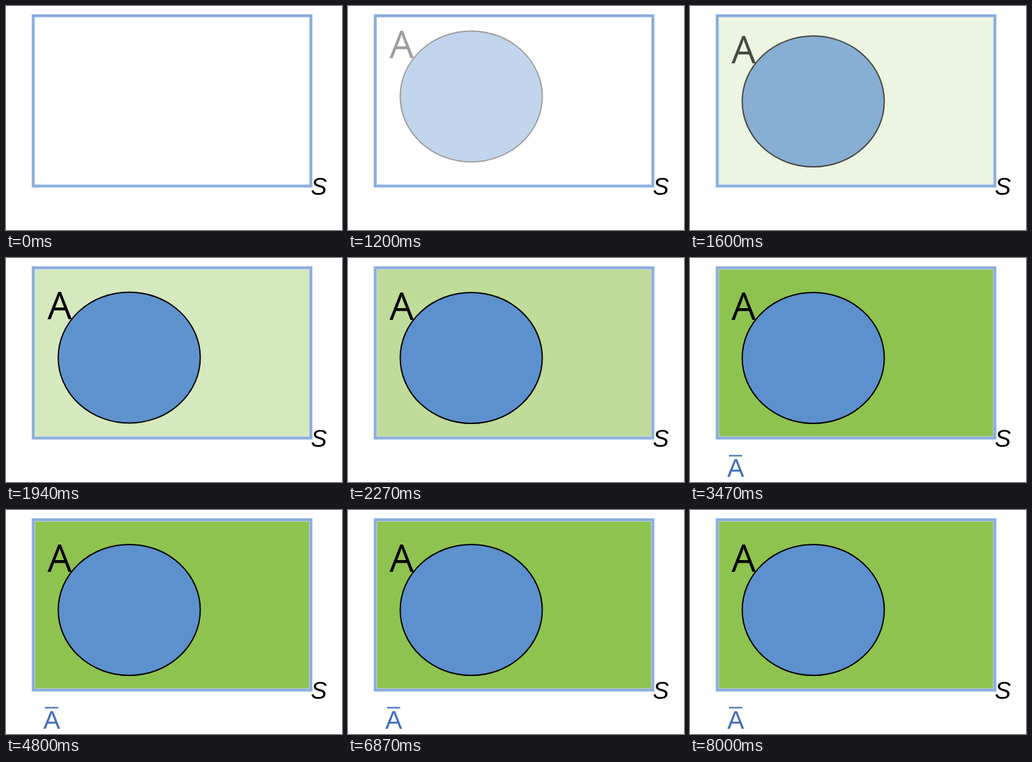
Recreate the animation shown at these times as an HTML page. Size 518 px wide and 344 px high, loop 8.06 s.

```html
<!DOCTYPE html>
<html lang="en">
<head>
<meta charset="utf-8">
<title>Complement of a set</title>
<style>
  html, body { margin: 0; height: 100%; overflow: hidden; background: #fff; }
  svg { display: block; width: 518px; height: 344px; }
  .sans { font-family: "Liberation Sans", Arial, sans-serif; }
  .set-label { font: 59px "Open Sans", sans-serif; }
</style>
</head>
<body>
<svg viewBox="0 0 518 344">
  <rect id="fill" x="42" y="15" width="428" height="261.5" fill="#8fc350"/>
  <g fill="none">
    <rect x="42" y="15" width="428" height="261.5" stroke="#c9daf2" stroke-opacity=".7" stroke-width="6"/>
    <rect x="42" y="15" width="428" height="261.5" stroke="#8aaddf" stroke-width="3.8"/>
  </g>
  <text class="sans" x="470" y="290" font-size="37" font-style="italic">S</text>
  <g id="set">
    <ellipse cx="190" cy="153.5" rx="109.5" ry="100.5" fill="#5d91ce" stroke="#000" stroke-width="2"/>
    <text class="set-label" x="64" y="95">A</text>
  </g>
  <g id="complement" fill="#446fb5">
    <text class="sans" x="57.5" y="336" font-size="39">A</text>
    <rect x="60" y="302.5" width="20.5" height="2.2"/>
  </g>
</svg>
<script>
  const LOOP = 8060;
  const [fill, set, complement] = ["fill", "set", "complement"].map(id => document.getElementById(id));

  const progress = (t, start, end) => Math.min(1, Math.max(0, (t - start) / (end - start)));

  function draw() {
    const t = performance.now() % LOOP;
    const drop = progress(t, 740, 1970);
    set.setAttribute("opacity", drop);
    set.setAttribute("transform", `translate(0 ${-23.3 * (1 - drop)})`);
    fill.setAttribute("opacity", progress(t, 1315, 2990));
    complement.setAttribute("opacity", progress(t, 2750, 3400));
    requestAnimationFrame(draw);
  }
  draw();
</script>
</body>
</html>
```
